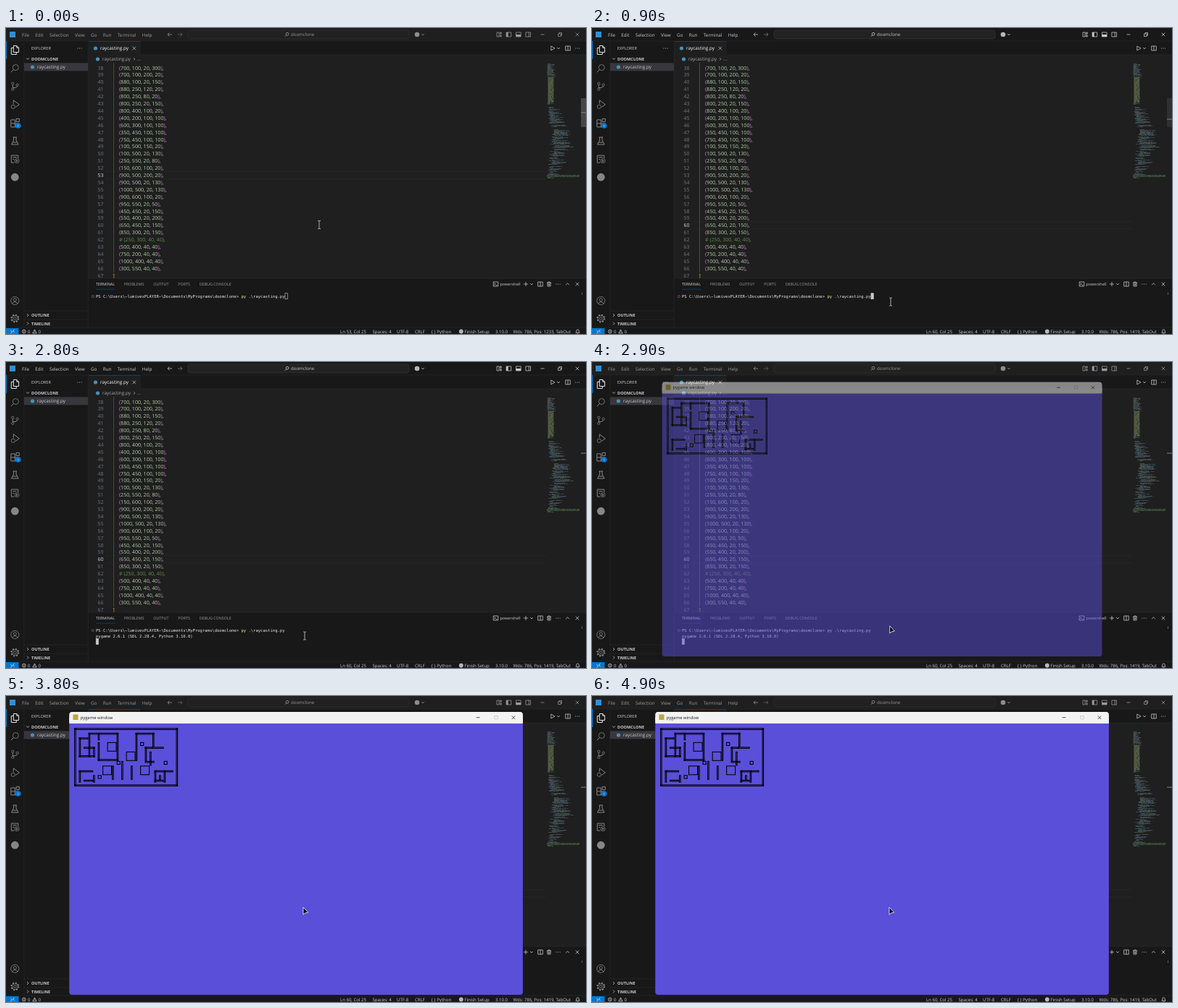
An HTML page that plays this animation: 800x423 px, repeating every 5000 ms.

```html
<!DOCTYPE html>
<html lang="en">
<head>
<meta charset="utf-8">
<title>Editor and game window</title>
<style>
  html, body { margin: 0; width: 100%; height: 100%; overflow: hidden; background: #181818; }
  svg { display: block; width: 100vw; height: 100vh; }
  text { white-space: pre; text-rendering: geometricPrecision; font-family: "Open Sans", "Noto Sans", sans-serif; }
  .mono { font-family: "DejaVu Sans Mono", monospace; }
</style>
</head>
<body>
<svg id="stage" viewBox="0 0 800 423"></svg>
<script>
const NS = 'http://www.w3.org/2000/svg';
const INK = '#cccccc', GREY = '#868686', BLUE = '#0078d4';
let layer = document.getElementById('stage');

function add(tag, attrs, parent = layer) {
  const el = document.createElementNS(NS, tag);
  for (const k in attrs) el.setAttribute(k, attrs[k]);
  parent.appendChild(el);
  return el;
}
const rect = (x, y, width, height, fill, more) => add('rect', { x, y, width, height, fill, ...more });
const dot = (cx, cy, r, fill) => add('circle', { cx, cy, r, fill });
const ring = (cx, cy, r, stroke = INK, more) =>
  add('circle', { cx, cy, r, stroke, fill: 'none', 'stroke-width': 0.8, ...more });

// y is the middle of the capital letters
function label(str, x, y, size, fill = INK, more) {
  const el = add('text', { x, y: y + size * 0.36, 'font-size': size, fill, ...more });
  el.textContent = str;
  return el;
}

// labels side by side with an even gap
function row(words, x, y, gap, size, tone) {
  words.split('|').forEach((word, i) => {
    x += label(word, x, y, size, tone(i)).getComputedTextLength() + gap;
  });
}

// line icon around its own centre
const icon = (x, y, d, stroke = INK, width = 0.75) => add('path', {
  d, stroke, fill: 'none', 'stroke-width': width, 'stroke-linejoin': 'round', transform: `translate(${x} ${y})`
});

function group(build, attrs) {
  const outer = layer;
  const g = layer = add('g', attrs);
  build();
  layer = outer;
  return g;
}

const DOWN = 'M-1.8-1L0 1L1.8-1', RIGHT = 'M-1-2L1 0L-1 2', UP = 'M-2.4 1.2L0-1.2L2.4 1.2';
const CROSS = 'M-2.3-2.3L2.3 2.3M2.3-2.3L-2.3 2.3', PLUS = 'M-3 0H3M0-3V3', MINUS = 'M-2.5 0H2.5';
const FRAME = 'M-3.3-3H3.3V3H-3.3Z', SPLIT = FRAME + 'M0-3V3', BOX = 'M-2.2-2.2H2.2V2.2H-2.2Z';
const TRASH = 'M-3-2H3M-1-2V-3H1V-2M-2.2-2L-2 3H2L2.2-2M-.7-.8V2M.7-.8V2';
const dots = (x, y) => [-2.6, 0, 2.6].forEach(d => dot(x + d, y, 0.55, INK));

const LISTING = `(700, 100, 20, 300),
(700, 100, 200, 20),
(880, 100, 20, 150),
(880, 250, 120, 20),
(800, 250, 80, 20),
(800, 250, 20, 150),
(800, 400, 100, 20),
(400, 200, 100, 100),
(600, 300, 100, 100),
(350, 450, 100, 100),
(750, 450, 100, 100),
(100, 500, 150, 20),
(100, 500, 20, 130),
(250, 550, 20, 80),
(150, 600, 100, 20),
(900, 500, 200, 20),
(900, 500, 20, 130),
(1000, 500, 20, 130),
(900, 600, 100, 20),
(950, 550, 20, 50),
(450, 450, 20, 150),
(550, 400, 20, 200),
(650, 450, 20, 150),
(850, 300, 20, 150),
# (250, 300, 40, 40),
(500, 400, 40, 40),
(750, 200, 40, 40),
(1000, 400, 40, 40),
(300, 550, 40, 40),`.split('\n');
const FIRST_LINE = 38;
const lineY = n => 55 + (n - FIRST_LINE) * 9.9;

// corner points of the wall runs declared above the visible code
const RUNS = [
  '50,50 1130,50 1130,650 50,650 50,50',
  '180,150 100,150 100,340 250,340 250,250 150,250',
  '200,340 200,100 500,100 500,380 300,380 300,200',
  '300,100 300,160'
];
const WALL = 20;
const runWalls = run => {
  const pts = run.split(' ').map(p => p.split(',').map(Number));
  return pts.slice(1).map(([x, y], i) => {
    const [px, py] = pts[i];
    return [Math.min(x, px), Math.min(y, py), Math.abs(x - px) + WALL, Math.abs(y - py) + WALL];
  });
};

// ---- backgrounds and borders
const titleBar = rect(0, 0, 800, 18, '#181818');
rect(113, 37, 687, 309, '#1f1f1f');
rect(114, 18, 71, 19, '#1f1f1f');
rect(114, 18, 71, 0.6, BLUE, { opacity: 0.6 });
icon(0, 0, 'M0 18H114M185 18H800M24.9 18V414M113.3 18V414M185 18V37H800M113 346H800M0 414H800M25 391H113M25 403H113', '#2b2b2b', 0.6);

// ---- title bar
rect(5, 5, 8, 8, '#2f8fd6');
const titleItems = group(() => {
  row('File|Edit|Selection|View|Go|Run|Terminal|Help', 22, 9.3, 8.4, 6.3, () => INK);
  icon(226, 9, 'M3 0H-3M-.5-2.5L-3 0L-.5 2.5');
  icon(240, 9, 'M-3 0H3M.5-2.5L3 0L.5 2.5', '#808080');
  rect(251, 3, 305, 12, '#222222', { rx: 3, stroke: '#3a3a3a', 'stroke-width': 0.6 });
  ring(388, 8.3, 1.9);
  icon(388, 8.3, 'M-1.3 1.3L-3.2 3.4');
  label('doomclone', 393, 9.2, 6.1);
  dot(567, 9, 3.3, '#b8b8b8');
  icon(575, 9, DOWN);
  const slot = i => 680 + i * 13.4;
  icon(slot(0), 9, 'M-3-3H0V3H-3ZM1.5-3H3.3V-.8H1.5ZM1.5 1H3.3V3H1.5Z');
  for (let i = 1; i < 4; i++) icon(slot(i), 9, FRAME);
  rect(slot(1) - 3.3, 6, 2.5, 6, INK);
  rect(slot(2) - 3.3, 9, 6.6, 3, INK);
  icon(slot(3), 9, 'M1-3V3');
  [MINUS, 'M-2.4-1H1.2V2.6H-2.4ZM-1-1V-2.4H2.5V1.2H1.2', CROSS].forEach((d, i) => icon(740 + i * 24, 9, d));
});

// ---- activity bar
const MID = 12.3, slotY = i => 30.5 + i * 25.1;
const bar = (y, d, tone = GREY) => icon(MID, y, d, tone, 1);
rect(0, 18, 1, 25, BLUE);
bar(slotY(0), 'M-2-6H2.5L5.3-3.2V3H-2ZM2.5-6V-3.2H5.3M-2-3H-5V6H2V3', '#e4e4e4');
ring(MID + 1, slotY(1) - 1, 4, GREY);
bar(slotY(1), 'M-2 2L-5.4 5.6');
[[-3, -4], [-3, 4], [3.4, -2]].forEach(([x, y]) => ring(MID + x, slotY(2) + y, 1.6, GREY));
bar(slotY(2), 'M-3-2.4V2.4M3.4-.4Q3 2-3 2');
bar(slotY(3), 'M-2-1V-6L6 0L1 3.6');
ring(MID - 2.5, slotY(3) + 3, 2.6, GREY);
bar(slotY(4), 'M-5.5-4H0V6H-5.5ZM-5.5 1H5V6H0M1.8-5.5H6V-1.4H1.8Z');
dot(16.8, 135, 3.8, BLUE);
label('1', 16.8, 135, 4.6, '#ffffff', { 'text-anchor': 'middle' });
bar(slotY(5), 'M-2.8-5H2.8M-1.7-5V-1L-4.8 5H4.8L1.7-1V-5M-3 2H3');
bar(slotY(6), 'M4.5-1V-5H-5V5H-1M-3-2.4H2.5M-3 .4H-1M2 1.4L4 2.6L2 3.8Z');
ring(MID + 2.8, slotY(6) + 2.6, 3, GREY);
dot(MID, slotY(7), 5.4, GREY);
ring(MID, 377, 5.6, GREY);
ring(MID, 375.6, 2, GREY);
bar(377, 'M-3.8 4Q0-1 3.8 4');
[1.8, 4].forEach(r => ring(MID, 401.5, r, GREY));
ring(MID, 401.5, 5, GREY, { 'stroke-width': 1.8, 'stroke-dasharray': 5 * Math.PI / 8 });

// ---- side bar
const fold = (name, y, d) => {
  icon(30, y, d);
  label(name, 35, y, 5.6, INK, { 'font-weight': 700 });
};
label('EXPLORER', 35, 28, 5.6);
dots(101.5, 28);
fold('DOOMCLONE', 42.5, DOWN);
fold('OUTLINE', 397, RIGHT);
fold('TIMELINE', 408.5, RIGHT);
rect(25, 48.4, 88, 11, '#37373d');

// ---- file names: tree, tab, breadcrumb
const file = (x, y, tone) => {
  dot(x - 6.5, y, 2.6, '#4a8fb4');
  label('raycasting.py', x, y - 0.2, 6.4, tone);
};
file(43, 54, INK);
file(130, 28, '#ffffff');
file(133, 43, '#a9a9a9');
icon(176.7, 28, CROSS);
icon(177, 43, 'M-1-1.8L.8 0L-1 1.8', '#a9a9a9');
label('...', 181, 42.5, 6.4, '#a9a9a9');
icon(754, 28, 'M-2.2-3L3 0L-2.2 3Z');
icon(762, 28, DOWN);
icon(775, 28, SPLIT);
dots(788, 28);

// ---- code
add('rect', { x: 113, y: 48, width: 687, height: 297.6 }, add('clipPath', { id: 'pane' }));
const lineNumbers = {};
let lineBox;
group(() => {
  lineBox = group(() => [0, 10].forEach(y => rect(139, y, 606, 0.6, '#2a2a2a')));
  rect(148.2, 48, 0.6, 290, '#626262');
  const number = n => lineNumbers[n] = label(n, 134.5, lineY(n), 7, '#6e7681', { 'text-anchor': 'end' });
  LISTING.forEach((src, i) => {
    const n = FIRST_LINE + i, comment = src[0] === '#';
    number(n);
    const line = label('', 156, lineY(n), 7.08);
    (comment ? [src] : src.match(/[()]|\d+|[, ]+/g)).forEach(part => {
      const fill = comment ? '#5f8c4c' : /\d/.test(part) ? '#b5cea8' : /[()]/.test(part) ? '#da70d6' : INK;
      add('tspan', { fill }, line).textContent = part;
    });
  });
  number(67);
  label(']', 147.5, lineY(67), 7, '#e6c700');
}, { 'clip-path': 'url(#pane)' });

// ---- code overview: a dense list, then code that nests deeper and back
let seed = 7;
const rnd = () => (seed = seed * 16807 % 2147483647) / 2147483647;
const COOL = ['#4f8a94', '#6c8f78', '#5678a0', '#8a8a8a'];
for (let y = 48; y < 210; y++) {
  const list = y > 67 && y < 103, long = y > 202 && y < 206;
  const depth = y < 104 ? 0 : Math.sin(Math.PI * (y - 104) / 106);
  if (!list && !long && rnd() < 0.15) continue;
  let x = 746 + (list ? 1.5 : long ? 0 : (1 + 11 * depth) * (0.3 + 0.7 * rnd()));
  const end = x + (list ? 8 : long ? 45 : (12 + 14 * depth) * (0.25 + 0.75 * rnd()));
  while (x < end) {
    const w = Math.min(end - x, 2 + rnd() * 6);
    rect(x, y, w, 0.65, list ? '#98ac70' : long ? '#5f8c5c' : COOL[Math.floor(rnd() * 4)], { opacity: 0.65 });
    x += w + 0.7;
  }
}
const slider = rect(793, 97, 7, 40, '#464646');
const mark = rect(793, 0, 7, 0.9, '#8c8c8c');

// ---- terminal panel
row('TERMINAL|PROBLEMS|OUTPUT|PORTS|DEBUG CONSOLE', 124, 354, 12.7, 5.4, i => i ? '#9d9d9d' : '#e0e0e0');
rect(124, 360.8, 27, 0.6, BLUE, { opacity: 0.6 });
icon(675.5, 354, FRAME + 'M-2-1.4L-.4 0L-2 1.4M.3 1.5H2');
label('powershell', 681.5, 354, 5.5);
icon(717, 354, PLUS);
icon(725, 354, DOWN);
icon(737, 354, SPLIT);
icon(749, 354, TRASH);
dots(761.5, 354);
icon(774.5, 354, UP);
icon(788, 354, CROSS);
rect(794, 365.6, 0.8, 3.2, '#777777');

const CELL = 3.346, MONO = { size: 5.56, tone: '#e6e6e6', more: { class: 'mono' } };
const print = (str, y) => label(str, 124, y, MONO.size, MONO.tone, MONO.more);
ring(119.8, 371, 1.6, '#7a7a7a', { 'stroke-width': 0.6 });
const prompt = print('PS C:\\Users\\~lumivexPLAYER~\\Documents\\MyPrograms\\doomclone> ', 371);
add('tspan', { fill: '#f0f08a' }, prompt).textContent = 'py';
add('tspan', {}, prompt).textContent = ' .\\raycasting.py';
const banner = print('pygame 2.6.1 (SDL 2.28.4, Python 3.10.0)', 379);
const block = rect(0, 0, CELL, 8, INK, { stroke: INK, 'stroke-width': 0.6 });

// ---- status bar
const STATUS = 419.5;
const status = (str, x) => label(str, x, STATUS, 6.05);
rect(0, 415, 17.5, 8, BLUE);
icon(9, STATUS, 'M-2.6-1.4L-.4 .6L-2.6 2.6M2.6-2.6L.4-.6L2.6 1.4', '#ffffff');
ring(24.8, STATUS, 2.4);
icon(24.8, STATUS, 'M-1-1L1 1M1-1L-1 1');
icon(39.5, STATUS, 'M0-2.6L2.7 2.3H-2.7ZM0-.8V.8');
status('0', 30);
status('0', 44.5);
const place = status('', 461);
status('Spaces: 4', 505.5);
status('UTF-8', 539);
status('CRLF', 564);
status('{ } Python', 586.5);
dot(627.8, STATUS, 2.9, '#b8b8b8');
status('Finish Setup', 632.3);
status('3.10.0', 675);
const counts = status('', 699.5);
icon(788.5, STATUS, 'M-2.6 1.8H2.6L1.8 .6V-.8A1.8 1.8 0 0 0-1.8-.8V.6ZM-.7 2.6H.7');

// ---- game window
const game = group(() => {
  rect(87.3, 22, 625.6, 391, '#5a4fd9', { rx: 4 });
  rect(87.3, 22, 625.6, 16, '#f3f3f3', { rx: 4 });
  rect(87.3, 30, 625.6, 8, '#f3f3f3');
  rect(92.5, 25.5, 7, 7.5, '#b9a83c');
  label('pygame window', 102.7, 29.4, 5.9, '#1c1c1c');
  icon(651, 29.7, MINUS, '#222222');
  icon(676, 29.7, BOX, '#c4c4c4');
  icon(700, 29.7, CROSS, '#222222');
  const listed = LISTING.filter(s => s[0] === '(').map(s => s.match(/\d+/g).map(Number));
  const k = 0.13, pen = 1.05;
  [...RUNS.flatMap(runWalls), ...listed].forEach(([x, y, w, h]) =>
    rect(87.6 + x * k + pen / 2, 37.8 + y * k + pen / 2, w * k - pen, h * k - pen, 'none',
      { stroke: '#000000', 'stroke-width': pen }));
});

// ---- pointers
const beam = group(() => {
  const d = 'M-1.9-5.5H-.5L0-5L.5-5.5H1.9M0-5V5M-1.9 5.5H-.5L0 5L.5 5.5H1.9';
  icon(0, 0, d, '#000000', 1.7);
  icon(0, 0, d, '#e8e8e8', 0.85);
});
const arrow = group(() => add('path', {
  d: 'M0 0V10.2L2.5 8L6.6 7.2Z', fill: '#000000', stroke: '#ffffff', 'stroke-width': 0.8, 'stroke-linejoin': 'round'
}));

// ---- motion
const LOOP = 5000, STEP = 100;
const CLICK = 100, FOCUS = 800, ENTER = 2000, BANNER = 2500, OPEN = 2900;
// pointer glides: start, duration, destination
const GLIDES = [[200, 500, 412, 378.5], [2800, 400, 404, 291], [3400, 400, 410, 292]];
const clamp = v => Math.min(1, Math.max(0, v));
const ease = v => v * v * (3 - 2 * v);

function pointerAt(t) {
  return GLIDES.reduce(([x, y], [start, span, toX, toY]) => {
    const f = ease(clamp((t - start) / span));
    return [x + (toX - x) * f, y + (toY - y) * f];
  }, [432, 272]);
}
const show = (el, on) => el.setAttribute('visibility', on ? 'visible' : 'hidden');

function render(t) {
  const open = t >= OPEN, clicked = t >= CLICK;
  const line = clicked ? 60 : 53;
  [53, 60].forEach(n => lineNumbers[n].setAttribute('fill', n === line ? '#d8d8d8' : '#6e7681'));
  lineBox.setAttribute('transform', `translate(0 ${lineY(line) - 5.3})`);
  mark.setAttribute('y', 47.6 + line * 1.3);
  place.textContent = `Ln ${line}, Col 25`;
  counts.textContent = `Wds: 786, Pos: ${clicked ? 1419 : 1233}, TabOut`;
  slider.setAttribute('opacity', 1 - clamp((t - 500) / 700));

  const lines = t < ENTER ? 0 : t < BANNER ? 1 : 2;
  block.setAttribute('x', lines ? 124.2 : 384.9);
  block.setAttribute('y', 366.7 + lines * 7.8);
  block.setAttribute('fill', t < FOCUS ? 'none' : INK);
  show(banner, t >= BANNER);

  const active = clicked && !open;
  titleBar.setAttribute('fill', active ? '#181818' : '#1f1f1f');
  titleItems.setAttribute('opacity', active ? 1 : 0.72);
  const grow = clamp((t - OPEN + 60) / 120);
  const s = 0.94 + 0.06 * grow;
  show(game, open);
  game.setAttribute('opacity', grow);
  game.setAttribute('transform', `translate(${400 * (1 - s)} ${217 * (1 - s)}) scale(${s})`);

  const [x, y] = pointerAt(t);
  [beam, arrow].forEach(p => p.setAttribute('transform', `translate(${x} ${y})`));
  show(beam, !open);
  show(arrow, open);
}

const start = performance.now();
function tick() {
  const t = (performance.now() - start) % LOOP;
  render(Math.floor(t / STEP) * STEP);
  requestAnimationFrame(tick);
}
tick();
</script>
</body>
</html>
```
